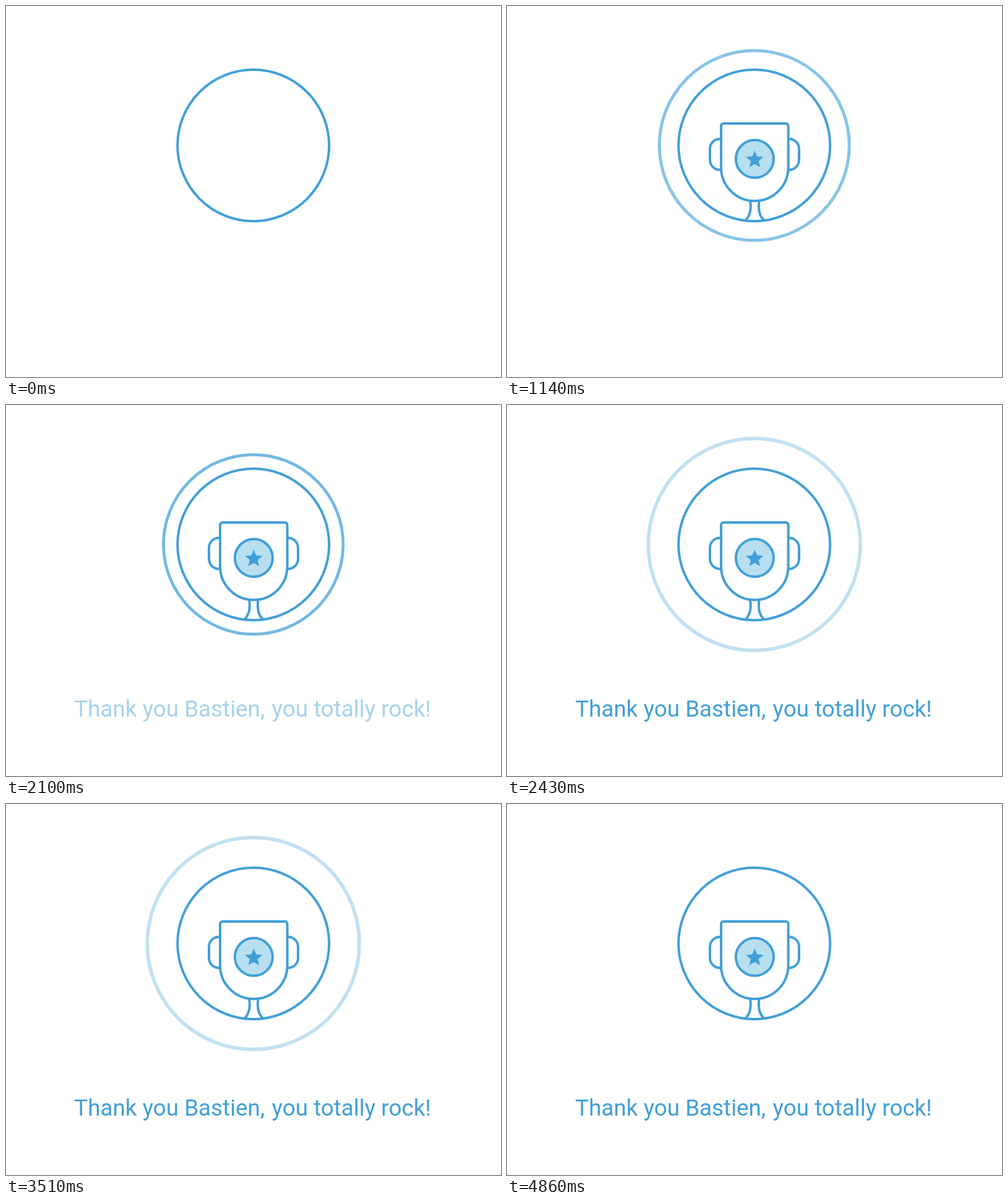
An HTML page that plays this animation: 800x600 px, repeating every 5400 ms.

```html
<!DOCTYPE html>
<html lang="en">
<head>
<meta charset="utf-8">
<title>Thank you</title>
<style>
  html, body { margin: 0; width: 100%; height: 100%; overflow: hidden; background: #fff; }
  svg { display: block; width: 100vw; height: 100vh; }
  .line { fill: none; stroke: #419fd8; stroke-width: 4; }
  text { font: 36.8px Roboto, sans-serif; fill: #419fd8; }
</style>
</head>
<body>
<svg viewBox="0 0 800 600">
  <defs>
    <clipPath id="disc"><circle cx="399.7" cy="225.5" r="122.5"/></clipPath>
  </defs>
  <circle id="ring" class="line" cx="399.7" cy="225.5" r="122.5"/>
  <g clip-path="url(#disc)">
    <g id="trophy" class="line">
      <path d="M346 215h-2a16 16 0 0 0-16 16v18a16 16 0 0 0 16 16h2"/>
      <path d="M455 215h1a16 16 0 0 1 16 16v18a16 16 0 0 1-16 16h-1"/>
      <path d="M346 194a4 4 0 0 1 4-4h100.6a4 4 0 0 1 4 4v67a54.3 54.3 0 0 1-108.6 0z"/>
      <path d="M393 316C395.500 330 393 339 385.500 347Q379 353 370 356"/>
      <path d="M407.500 316C405.500 330 408 340 415.500 347Q422 353 431 356"/>
      <circle cx="400.4" cy="247.3" r="30.5" style="fill:#b8dff0"/>
      <polygon id="star" fill="#419fd8" stroke="none"/>
    </g>
  </g>
  <circle class="line" cx="399.7" cy="225.5" r="122.5"/>
  <g id="message">
    <text x="110.3" y="504">Thank you Bastien,</text>
    <text x="429.6" y="504">you totally rock!</text>
  </g>
</svg>
<script>
const LOOP = 5400, STEP = 30;
const RINGS = [840, 1890, 2970, 4050], RING_TIME = 800;
const RISE_START = 90, RISE_TIME = 750;
const TEXT_START = 1890, TEXT_TIME = 450;

const el = id => document.getElementById(id);
const clamp = v => Math.min(1, Math.max(0, v));
const ring = el('ring'), trophy = el('trophy'), message = el('message');

function starPoints(cx, cy, outer, inner) {
  return Array.from({ length: 10 }, (_, i) => {
    const r = i % 2 ? inner : outer, a = i * Math.PI / 5;
    return `${cx + r * Math.sin(a)},${cy - r * Math.cos(a)}`;
  }).join(' ');
}
el('star').setAttribute('points', starPoints(400.3, 248.7, 15, 6.7));

// Ease-out with an overshoot of about 15%
function backOut(u) {
  const s = 2.2, v = u - 1;
  return 1 + (s + 1) * v ** 3 + s * v * v;
}

function drawTrophy(t) {
  const u = clamp((t - RISE_START) / RISE_TIME), left = 1 - backOut(u);
  trophy.setAttribute('visibility', u > 0 ? 'visible' : 'hidden');
  trophy.setAttribute('transform',
    `translate(0 ${130 * left}) rotate(${-55 * left} 400.3 349)`);
}

function drawRing(t) {
  const n = RINGS.filter(s => s <= t).length;
  let age = n ? t - RINGS[n - 1] : RING_TIME;
  // A trace of each ring stays until the next one; the last clears
  if (n && n < RINGS.length) age = Math.min(age, RING_TIME - 20);
  const x = clamp(age / RING_TIME), scale = 1 + 0.5 * (1.56 * x - 0.56 * x * x);
  ring.setAttribute('r', 122.5 * scale);
  ring.style.strokeWidth = 4 * scale;
  ring.setAttribute('opacity', 1 - x);
}

function draw(ms) {
  const t = Math.floor(ms % LOOP / STEP) * STEP;
  drawTrophy(t);
  drawRing(t);
  message.setAttribute('opacity', clamp((t - TEXT_START) / TEXT_TIME));
}

const start = performance.now();
function tick() {
  draw(performance.now() - start);
  requestAnimationFrame(tick);
}
tick();
</script>
</body>
</html>
```
